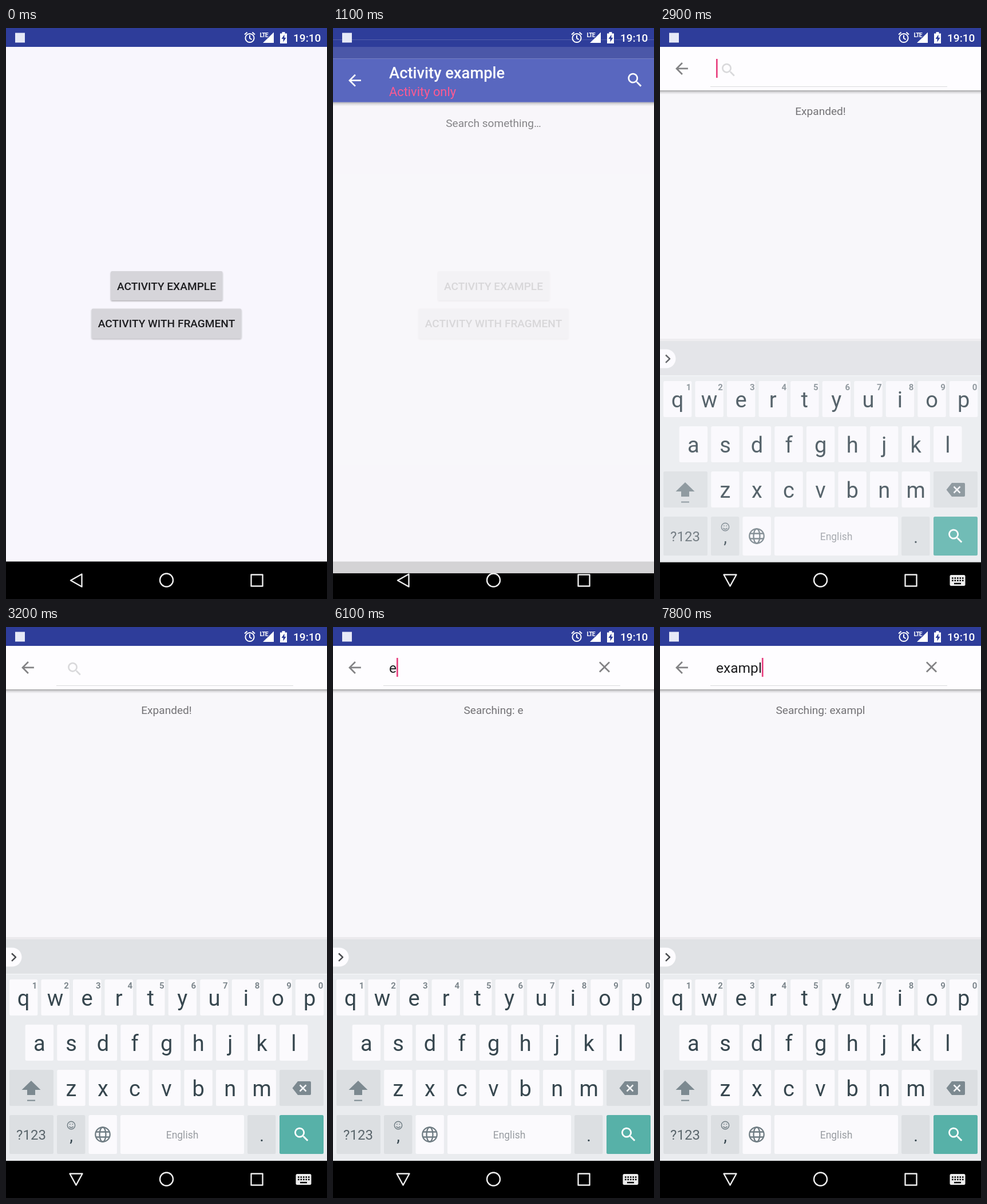
These frames come from a looping animation (561 by 998 pixels, 8 s). An HTML page:

```html
<!DOCTYPE html>
<html lang="en">
<head>
<meta charset="utf-8">
<title>Search demo</title>
<style>
html, body { margin: 0; width: 100%; height: 100%; overflow: hidden; background: #000; }
svg { display: block; font-family: Roboto, "Noto Sans", sans-serif; }
.mid { text-anchor: middle; }
.bold { font-weight: 500; }
.body { font-size: 19.1px; }
.key { fill: #fbfafd; }
.dim { fill: #dcdfe2; }
.char { font-size: 38px; fill: #37474f; text-anchor: middle; }
.num { font-size: 15px; font-weight: 700; fill: #7d878d; text-anchor: middle; }
.line { fill: none; stroke-linejoin: round; }
</style>
</head>
<body>
<svg width="561" height="998" viewBox="0 0 561 998">
  <defs>
    <path id="lens" d="M15.5 14h-.79l-.28-.27C15.41 12.59 16 11.11 16 9.5 16 5.91 13.09 3 9.5 3S3 5.91 3 9.5 5.91 16 9.5 16c1.61 0 3.09-.59 4.23-1.57l.27.28v.79l5 4.99L20.49 19l-4.99-5zm-6 0C7.01 14 5 11.99 5 9.5S7.01 5 9.5 5 14 7.01 14 9.5 11.99 14 9.5 14z"/>
    <path id="arrow" d="M20 11H7.83l5.59-5.59L12 4l-8 8 8 8 1.41-1.41L7.83 13H20v-2z"/>
    <path id="cross" d="M19 6.41L17.59 5 12 10.59 6.41 5 5 6.41 10.59 12 5 17.59 6.41 19 12 13.41 17.59 19 19 17.59 13.41 12z"/>
    <linearGradient id="fade" x2="0" y2="1">
      <stop offset="0" stop-opacity=".36"/>
      <stop offset=".4" stop-opacity=".14"/>
      <stop offset="1" stop-opacity="0"/>
    </linearGradient>
    <filter id="drop" x="-20%" y="-20%" width="140%" height="150%">
      <feDropShadow dx="0" dy="1.5" stdDeviation="1.3" flood-opacity=".3"/>
    </filter>
    <clipPath id="btnClip"><rect x="183" y="425" width="195.500" height="51" rx="2.7"/></clipPath>
    <clipPath id="barClip"><circle id="reveal" cx="527" cy="71" r="0"/></clipPath>
  </defs>

  <g id="home">
    <rect width="561" height="998" fill="#f8f6fd"/>
    <rect width="561" height="33" fill="#2e3d9a"/>
    <rect y="932.500" width="561" height="66"/>
    <g fill="#d6d5da" filter="url(#drop)">
      <rect x="183" y="425" width="195.500" height="51" rx="2.7"/>
      <rect x="149.500" y="490.500" width="262" height="52" rx="2.7"/>
    </g>
    <circle id="ripple" cx="288" cy="452" clip-path="url(#btnClip)"/>
    <g class="mid bold body" fill="#1c1c1f">
      <text x="280.500" y="457.500">ACTIVITY EXAMPLE</text>
      <text x="280.500" y="523">ACTIVITY WITH FRAGMENT</text>
    </g>
  </g>

  <g id="page">
    <rect width="561" height="998" fill="#f8f7fa"/>
    <rect width="561" height="33" fill="#2e3d9a"/>
    <rect y="932.500" width="561" height="66"/>
    <rect y="109" width="561" height="7" fill="url(#fade)"/>
    <rect y="33" width="561" height="76" fill="#3f50b5"/>
    <use href="#arrow" fill="#fff" transform="translate(21.600 54.600) scale(1.365)"/>
    <text class="bold" x="98" y="67" font-size="27.3" fill="#fff">Activity example</text>
    <text x="98" y="98.500" font-size="21.84" fill="#ff4081">Activity only</text>
    <circle id="halo" cx="528" cy="70" fill="#fff"/>
    <use href="#lens" fill="#fff" transform="translate(511.300 54) scale(1.365)"/>
    <g clip-path="url(#barClip)">
      <rect y="33" width="561" height="76" fill="#fefdff"/>
      <use href="#arrow" fill="#838385" transform="translate(21.600 54.600) scale(1.365)"/>
      <rect x="88" y="102" width="414" height="1" fill="#dadadc"/>
      <use id="hint" href="#lens" fill="#d9d9db" transform="translate(104.300 58) scale(1.29)"/>
      <use id="clear" href="#cross" fill="#828284" transform="translate(458.100 53.600) scale(1.365)"/>
      <text id="query" x="98" y="80" font-size="24.57" fill="#1c1c1e"></text>
      <rect id="caret" y="54" width="2.700" height="33" fill="#e8407f"/>
    </g>
    <text id="label" class="mid body" x="280.500" y="152" fill="#737275"></text>
  </g>

  <g id="board"></g>

  <g id="status" fill="#fff">
    <rect x="16" y="8.500" width="17" height="17" fill="#e6e9f7"/>
    <g class="line" stroke="#fff" stroke-width="2">
      <circle cx="426" cy="17.500" r="7.600"/>
      <path d="M426 12.500v5.500l3.500 2.200M417 11.500l4.500-4M435 11.500l-4.500-4"/>
    </g>
    <path d="M468 7.500V26H449z"/>
    <text x="443.500" y="15.500" font-size="10.500" font-weight="700" letter-spacing="-.9" stroke="#2e3d9a" stroke-width="2" paint-order="stroke">LTE</text>
    <path d="M482.500 7h5v2.500h3.500V27h-12V9.500h3.500z"/>
    <path d="M486.500 11.500l-5 7.500h3v5.500l5-7.500h-3z" fill="#2e3d9a"/>
    <text class="bold" x="502" y="24" font-size="19.1">19:10</text>
  </g>

  <rect y="953.500" width="561" height="45"/>
  <g class="line" stroke="#ececec" stroke-width="2.400">
    <path id="back" d="M113 965.500L132.500 954.500V976.500z"/>
    <path id="hide" d="M111.500 955.500H133.500L122.500 975.500z"/>
    <circle cx="280.500" cy="965" r="11.500"/>
    <rect x="428.500" y="955.500" width="20" height="20"/>
  </g>
  <g id="swap">
    <rect x="506.500" y="956" width="27" height="19" rx="2.500" fill="#ececec"/>
    <path d="M510 961.500h20.500M510 965.800h20.500" stroke="#000" stroke-width="2.600" stroke-dasharray="2.600 1.900"/>
    <path d="M514 971h12" stroke="#000" stroke-width="2.400"/>
  </g>

  <circle id="touch" r="15" fill="#fff" fill-opacity=".62" stroke="#a3a9dc" stroke-opacity=".75" stroke-width="2"/>
</svg>

<script>
const LOOP = 8000, STEP = 100, PITCH = 55.55;
const $ = id => document.getElementById(id);
const clamp = v => Math.max(0, Math.min(1, v));
const part = (t, start, span) => clamp((t - start) / span);
const easeOut = (x, power) => 1 - (1 - x) ** power;
const set = (id, attrs) => {
  for (const name in attrs) $(id).setAttribute(name, attrs[name]);
};
const show = (id, on) => set(id, { opacity: +on });

// Keyboard
const rows = [["qwertyuiop", 30.6, 616], ["asdfghjkl", 58.4, 695], ["zxcvbnm", 113.900, 774]];
const spots = {};
const keyRect = (x, y, w, h, look = "key") =>
  `<rect class="${look}" x="${x}" y="${y}" width="${w}" height="${h}" rx="2.5"/>`;

function buildBoard() {
  let out = `<rect y="542" width="561" height="5" fill="#000" opacity=".05"/>
    <rect y="546" width="561" height="387" fill="#eaecef"/>
    <rect y="546" width="561" height="60" fill="#e0e2e5"/>
    <rect y="606" width="561" height="1.500" fill="#f4f5f7"/>
    <path d="M0 560.500H11a16.500 16.500 0 0 1 0 33H0z" fill="#fdfcff"/>
    <path class="line" d="M10 570.500l7 6.700-7 6.700" stroke="#4a4c50" stroke-width="2.500"/>`;
  let keys = "";
  rows.forEach(([chars, left, top], r) => [...chars].forEach((c, i) => {
    const x = left + i * PITCH;
    spots[c] = { x, top };
    keys += keyRect(x - 24.700, top, 49.400, 63);
    out += "";
    if (r === 0) keys += `<text class="num" x="${x + 19.5}" y="631.500">${(i + 1) % 10}</text>`;
    keys += `<text class="char" x="${x}" y="${top + 46}">${c}</text>`;
  }));
  out += `<g>${keys}</g>`;
  out += keyRect(6, 774, 77, 63, "dim") + keyRect(478, 774, 77, 63, "dim");
  out += keyRect(6, 853, 77, 68, "dim") + keyRect(89, 853, 49.4, 68, "dim");
  out += keyRect(144.5, 853, 49.4, 68) + keyRect(200, 853, 216, 68);
  out += keyRect(422, 853, 49.4, 68, "dim");
  out += `<rect x="478" y="853" width="77" height="68" rx="2.500" fill="#57b1a8"/>
    <path d="M44 793l16.500 16H51v9H37v-9H27.500zM37 826.500h14v2H37z" fill="#7c8990"/>
    <path d="M510 794h21q2 0 2 2v20q0 2-2 2h-21l-9.500-12z" fill="#7c8990"/>
    <path d="M513.500 800.500l11 11m0-11l-11 11" stroke="#f4f5f7" stroke-width="2.500"/>
    <text class="mid" x="44" y="896" font-size="24" fill="#5b666c">?123</text>
    <text class="mid" x="114" y="899" font-size="29" fill="#37474f">,</text>
    <text class="mid" x="447" y="899" font-size="29" fill="#37474f">.</text>
    <text class="mid" x="308" y="894" font-size="17.500" fill="#989ca1">English</text>
    <g class="line" stroke="#6f7c83" stroke-width="1.400">
      <circle cx="114" cy="871" r="6.700"/>
      <path d="M110.500 873q3.500 4 7 0M111 869h1.600M115.500 869h1.600"/>
    </g>
    <g class="line" stroke="#6f7c83" stroke-width="2.300">
      <circle cx="169" cy="887" r="12.700"/>
      <ellipse cx="169" cy="887" rx="5.500" ry="12.700"/>
      <path d="M157 882.500h24M157 891.500h24"/>
    </g>
    <use href="#lens" fill="#fff" transform="translate(500 870.500) scale(1.38)"/>
    <g id="popup">
      <rect x="-28.700" y="-88" width="57.400" height="152" rx="6" fill="#d4d4d7" filter="url(#drop)"/>
      <text id="popChar" class="char" y="-38"></text>
      <path id="dots" d="M10 -24h12" stroke="#77797d" stroke-width="2" stroke-dasharray="2 3"/>
    </g>`;
  $("board").innerHTML = out;
}

const presses = [["e", 5000], ["x", 6200], ["a", 6500], ["m", 7000], ["p", 7300], ["l", 7600]];
const FOCUS = 2600, OPEN = 1017;

function drawTyping(t) {
  const typed = presses.filter(([, at]) => t >= at + 100);
  const text = typed.map(p => p[0]).join("");
  const since = typed.length ? typed[typed.length - 1][1] + 100 : FOCUS;
  $("query").textContent = text;
  $("label").textContent = t < FOCUS ? "Search something…" : text ? "Searching: " + text : "Expanded!";
  show("hint", !text);
  set("clear", { opacity: part(t, 5000, 200) });
  set("caret", {
    x: 98 + (text ? $("query").getComputedTextLength() : 0),
    opacity: +(t >= FOCUS && Math.floor((t - since) / 500) % 2 === 0)
  });

  const held = presses.find(([, at]) => t >= at && t < at + 200);
  show("popup", held);
  if (!held) return set("popup", { opacity: 0 });
  const [c, at] = held, { x, top } = spots[c];
  $("popChar").textContent = c;
  show("dots", "eap".includes(c));
  set("popup", { transform: `translate(${x} ${top})`, opacity: t < at + 100 ? 1 : .45 });
}

function touchAt(t) {
  if (t >= 500 && t < 700) return [288, 452];
  if (t >= 2400 && t < 2500) return [528, 69.500];
  const hit = presses.find(([, at]) => t >= at && t < at + 100);
  return hit && [spots[hit[0]].x + 1, spots[hit[0]].top + 36];
}

function draw(t) {
  // Button press, then the second window rises into place
  set("ripple", {
    r: 20 + 130 * easeOut(part(t, 500, 400), 2),
    opacity: t < 500 ? 0 : .1 * (1 - part(t, 800, 250))
  });
  set("page", {
    transform: `translate(0 ${80 * (1 - easeOut(part(t, OPEN, 350), 5))})`,
    opacity: easeOut(part(t, OPEN, 200), 3.600)
  });

  // Search bar and keyboard
  set("halo", {
    r: 18 + 10 * part(t, 2400, 200),
    opacity: t < 2400 ? 0 : .22 * (1 - part(t, 2500, 300))
  });
  set("reveal", { r: 535 * (1 - Math.cos(Math.PI * part(t, 2550, 300))) / 2 });
  const rise = part(t, 2750, 250);
  set("board", {
    transform: `translate(0 ${40 * (1 - easeOut(rise, 4))})`,
    opacity: easeOut(rise, 2)
  });
  show("back", !rise);
  show("hide", rise > 0);
  show("swap", rise > 0);
  drawTyping(t);

  const spot = touchAt(t);
  show("touch", !!spot);
  if (spot) set("touch", { cx: spot[0], cy: spot[1] });
}

function tick(now) {
  draw(Math.floor((now % LOOP) / STEP) * STEP);
  requestAnimationFrame(tick);
}

buildBoard();
draw(0);
requestAnimationFrame(tick);
</script>
</body>
</html>
```
